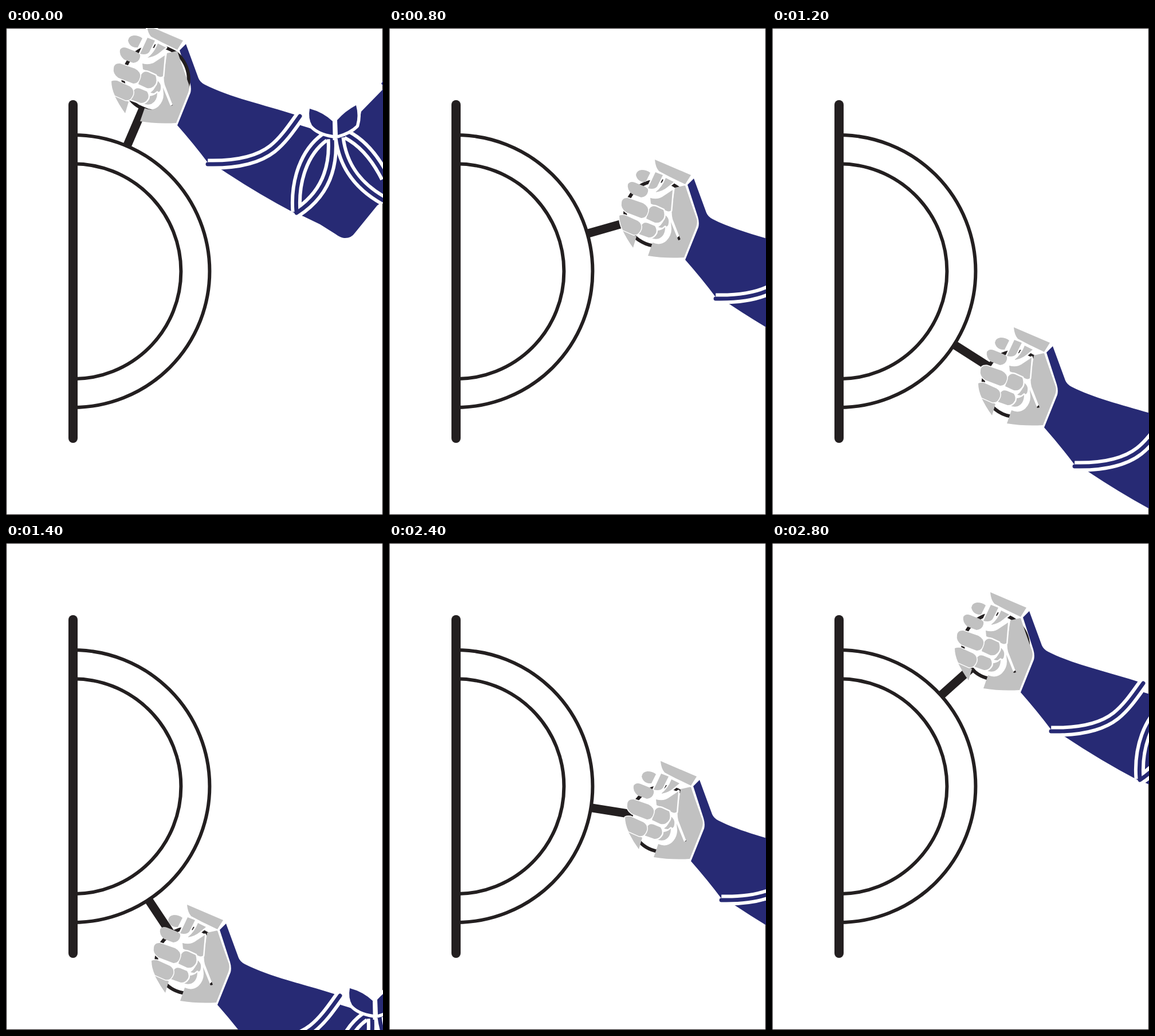
Animation, 658 px wide and 851 px high, one loop 3000 ms. Source, as an HTML page:

```html
<!DOCTYPE html>
<html lang="en">
<head>
<meta charset="utf-8">
<title>Turning the crank</title>
<style>
  html, body { margin: 0; width: 100%; height: 100%; overflow: hidden; background: #fff; }
  svg { display: block; width: 658px; height: 851px; }
  .ink { fill: none; stroke: #231f20; stroke-width: 6; }
  .blue { fill: #272a74; }
  .gray { fill: #c1c1c1; }
  .edged { stroke: #fff; stroke-width: 5; paint-order: stroke; stroke-linejoin: round; }
  .leaf { stroke: #fff; stroke-width: 11; paint-order: stroke; stroke-linejoin: round; }
  .trim { fill: none; stroke: #fff; stroke-width: 19; }
  .cord { fill: none; stroke: #272a74; stroke-width: 7; stroke-linecap: round; }
</style>
</head>
<body>
<svg viewBox="0 0 658 851">
  <defs>
    <path id="cuff" d="M352 238C395 239 437 233 465 211C485 195 500 172 513 154"/>
    <path id="loopA" d="M556 191C520 217 503 268 507 321"/>
    <path id="loopB" d="M569 194C573 258 546 298 507 323"/>
    <path id="loopC" d="M582 192C588 240 613 276 660 302"/>
    <path id="loopD" d="M594 186C625 202 646 230 662 262"/>
  </defs>
  <rect x=".5" y=".5" width="657" height="850" class="ink" style="stroke-width:1.2"/>

  <!-- wheel -->
  <path class="ink" d="M117.4 187A238 238 0 0 1 117.4 663M117.4 237.2A188 188 0 0 1 117.4 613.2"/>
  <path class="ink" d="M117 134V717" style="stroke-width:16;stroke-linecap:round"/>

  <!-- sleeve -->
  <g id="sleeve">
    <path class="blue" d="M314 28L336 88Q339 95 347 99C390 121 450 134 506 152L514 170L527 174L560 185L590 185L617 162L620 146L658 107V303L648 310L609 358Q602 368 590 367Q583 366 575 360L548 343L519 329L503 323Q440 290 377 248L352 235Q328 203 299 170L322 113Q324 105 321 95L303 39Z"/>
    <path class="blue" d="M655 97L658 93V101Z"/>
    <g class="trim">
      <use href="#cuff"/><use href="#loopA"/><use href="#loopB"/><use href="#loopC"/><use href="#loopD"/>
    </g>
    <g class="cord">
      <use href="#cuff"/><use href="#loopA"/><use href="#loopB"/><use href="#loopC"/><use href="#loopD"/>
    </g>
    <g class="blue leaf">
      <path d="M530 141Q553 147 570 163L571 187Q545 183 534 170Q527 158 530 141Z"/>
      <path d="M578 161Q592 145 611 135Q616 153 611 170Q600 181 579 187Z"/>
    </g>
    <path d="M574 162V196" stroke="#fff" stroke-width="7"/>
  </g>

  <!-- crank, turning about the wheel's centre -->
  <g id="crank" class="ink">
    <path d="M354 425H430" style="stroke-width:15"/>
    <circle cx="483.4" cy="425" r="57"/>
  </g>

  <!-- gauntlet -->
  <g id="hand" class="gray">
    <path d="M281 44L299 40Q305 59 319 98Q321 105 318 113L297 166Q264 168 234 163L242 140Q256 146 266 137Q275 128 275 116L274 104L287 136L291 135L277 99Q274 88 277 70Z"/>
    <path d="M189 117L214 129L208 149Q197 134 189 117Z"/>
    <g class="edged">
      <path d="M264 92Q273 98 269 110Q263 116 252 113Q262 106 264 92Z"/>
      <path d="M249 119Q258 119 264 113Q264 128 253 133Q246 135 240 132Q249 130 249 119Z"/>
      <path d="M238 62Q252 66 262 58L277 48L274 84Q270 88 260 81L239 72Z"/>
      <path d="M235 84Q239 74 248 77L261 83Q264 92 261 98Q255 107 246 105L231 98Z"/>
      <path d="M222 111Q226 103 234 106L246 111Q250 117 248 123Q243 132 235 131L218 125Z"/>
      <path d="M265 27L279 34L268 43Q260 50 247 52Q259 43 265 27Z"/>
      <path d="M247 17L260 22L250 42Q245 48 234 45Z"/>
    </g>
    <path d="M213 22Q214 14 223 13Q232 13 238 18L230 34Q216 35 213 22Z"/>
    <path d="M199 38Q203 32 211 35L226 41Q236 45 234 51Q232 60 222 61L206 55Q197 47 199 38Z"/>
    <g class="edged" style="stroke-width:3">
      <path d="M188 70Q189 61 199 62L225 71Q236 77 234 86Q231 98 222 97L196 87Q186 80 188 70Z"/>
      <path d="M184 93Q188 91 194 92L216 102Q224 107 222 116Q218 128 208 126L190 118Q184 105 184 93Z"/>
    </g>
    <path class="edged" d="M246 -5L309 22L299 38L272 25L253 15Q247 8 246 -5Z"/>
  </g>
</svg>
<script>
  const LOOP = 3000;

  // crank angle in degrees, then the arm's shift
  const poses = {
    top: [66.8, 0, 0],
    high: [41.8, 135, 91],
    upper: [16, 218, 235],
    lower: [-9.1, 228, 386],
    low: [-32.6, 176, 528],
    bottom: [-56.5, 70, 637]
  };

  const steps = [
    [0, "top"], [600, "high"], [800, "upper"], [1000, "lower"], [1200, "low"],
    [1400, "bottom"], [2200, "low"], [2400, "lower"], [2600, "upper"], [2800, "high"]
  ];

  const [sleevePart, crankPart, handPart] =
    ["sleeve", "crank", "hand"].map(id => document.getElementById(id));

  function show(time) {
    const current = steps.filter(([start]) => start <= time).pop();
    const [angle, x, y] = poses[current[1]];
    crankPart.setAttribute("transform", `rotate(${-angle} 117.4 425)`);
    for (const part of [sleevePart, handPart]) {
      part.setAttribute("transform", `translate(${x} ${y})`);
    }
  }

  const begin = performance.now();
  function tick() {
    show(Math.max(0, performance.now() - begin) % LOOP);
    requestAnimationFrame(tick);
  }
  tick();
</script>
</body>
</html>
```
